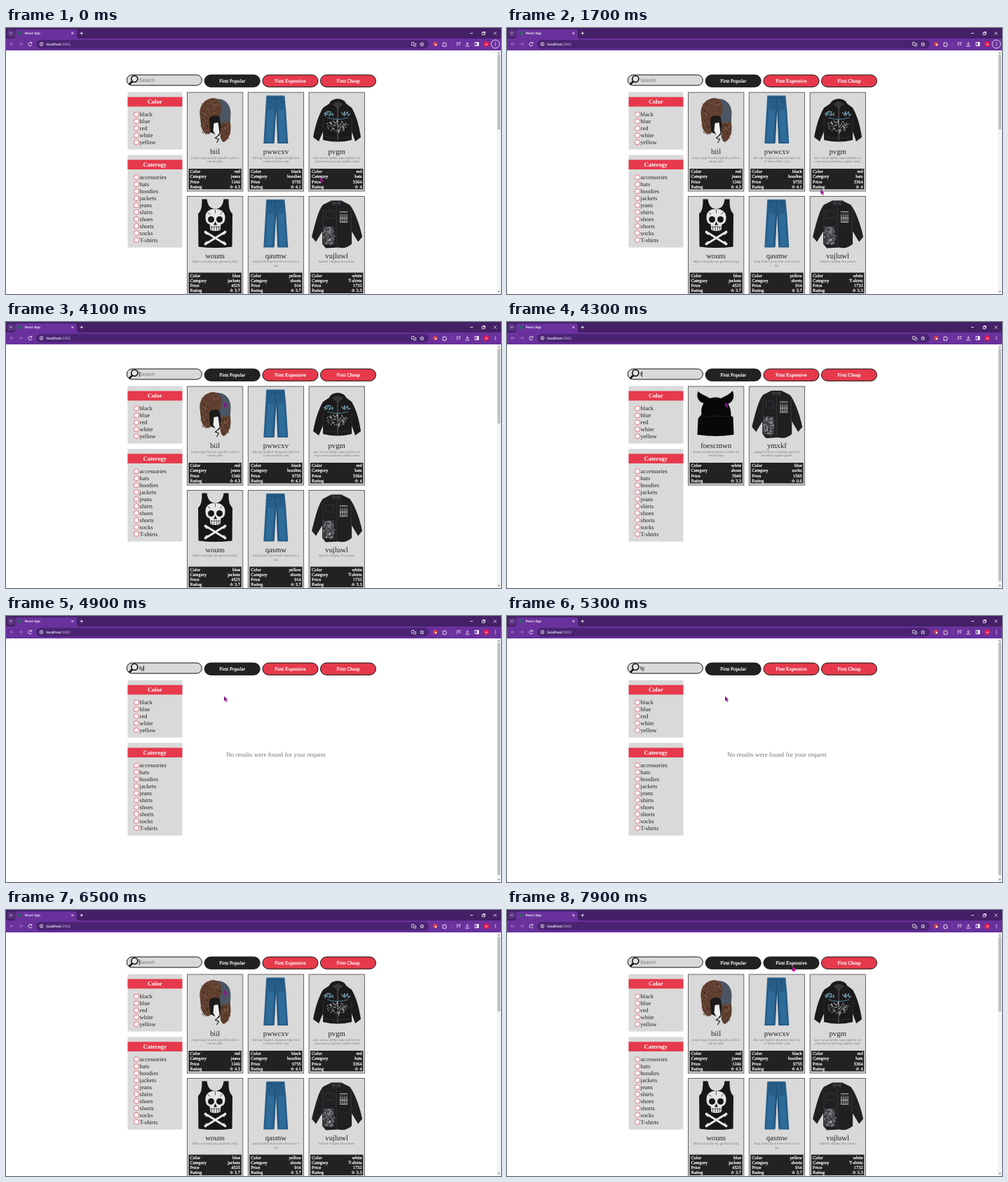
An HTML page that plays this animation: 706x380 px, repeating every 8000 ms.

```html
<!DOCTYPE html>
<html lang="en">
<head>
<meta charset="utf-8">
<title>Shop search</title>
<style>
html, body { margin: 0; width: 100%; height: 100%; overflow: hidden; background: #fff; }
svg { display: block; width: 706px; height: 380px; text-rendering: geometricPrecision; }
text { font-family: "Liberation Serif", "DejaVu Sans", serif; }
.light { stroke: #fff; stroke-width: .22; }
.ui { font-family: "Open Sans", sans-serif; font-weight: 600; fill: #fff; }
.field { font-family: "Liberation Sans", sans-serif; }
.icon { fill: none; stroke: #fff; stroke-width: .8; }
</style>
</head>
<body>
<svg id="stage" viewBox="0 0 706 380"></svg>
<script>
const LOOP = 8000;
const RED = '#e63a4c', DARK = '#222', GREY = '#d9d9d9';

let seed = 7;
const random = () => (seed = seed * 16807 % 2147483647) / 2147483647;

const rect = (x, y, w, h, fill, more = '') =>
  `<rect x="${x}" y="${y}" width="${w}" height="${h}" fill="${fill}" ${more}/>`;
const circle = (x, y, r, fill, more = '') => `<circle cx="${x}" cy="${y}" r="${r}" fill="${fill}" ${more}/>`;
const shape = (d, fill, more = '') => `<path d="${d}" fill="${fill}" ${more}/>`;
const line = (d, stroke, width = 1, more = '') =>
  `<path d="${d}" fill="none" stroke="${stroke}" stroke-width="${width}" ${more}/>`;
const icon = (d, more = '') => `<path class="icon" d="${d}" ${more}/>`;
const text = (x, y, size, fill, str, more = '') =>
  `<text x="${x}" y="${y}" font-size="${size}" fill="${fill}" ${more}>${str}</text>`;
const MID = 'text-anchor="middle"', END = 'text-anchor="end"', BOLD = 'font-weight="bold"', LIGHT = 'class="light"';

// Short random strokes inside an ellipse
function strokes(cx, cy, rx, ry, count, length) {
  let d = '';
  for (let i = 0; i < count; i++) {
    const a = random() * 2 * Math.PI, r = Math.sqrt(random());
    const x = cx + rx * r * Math.cos(a), y = cy + ry * r * Math.sin(a);
    d += `M${x.toFixed(1)} ${y.toFixed(1)}l${((random() - .5) * length).toFixed(1)} ${((random() - .3) * length).toFixed(1)}`;
  }
  return d;
}

const pictures = {
  furHat() {
    const fur = n => strokes(33, 22, 14, 11, n, 4) + strokes(25, 44, 6, 15, n, 4) + strokes(54, 56, 7, 13, n, 4);
    return shape('M27 30H48L52 50 45 62 31 56Z', '#1d1a1a') +
      shape('M38 44 44 43 46 58 42 63 37 55Z', '#eee') +
      shape('M40 9C54 8 62 17 62 30L61 47 48 46 45 28Z', '#4b5563') +
      shape('M18 32C17 18 25 9 37 8 45 9 50 15 49 25L46 35C40 31 34 33 31 38L33 58C29 62 23 58 20 50Z', '#60402f') +
      shape('M49 43 61 42C64 54 60 68 52 71 46 69 46 56 49 43Z', '#60402f') +
      line(fur(40), '#8b6450', .8) + line(fur(40), '#38231b', .8) +
      line('M46 60 40 65 45 67 42 72', '#222', 1.2);
  },
  jeans: () =>
    shape('M26 4.500H52L54 25 57 73H42L40 26 37 73H22Z', '#285f8a') +
    shape('M28 24 37 26 34 71 25 71ZM43 26 51 24 54 71 45 71Z', '#2e6c9a') +
    line('M26 8H52M39 8V25M27 14Q33 16 34 9M51 14Q46 16 45 9M39 26 37 72M41 26 43 72', '#1b4467', .7),
  hoodie: () =>
    shape('M29 16C32 7 50 7 53 16L61 22C68 34 72 50 74 64L66 70 61 56 61 68Q41 73 20 68L20 56 14 70 6 64C9 48 13 34 20 22Z', '#1c1a1b') +
    shape('M33 17Q41 10 49 17L41 23Z', '#383638') +
    line('M41 21V69', '#888', .7) +
    line('M21 31l4-3-2 5 4-2v-4l4 1-2 5 5-3v4M46 28l3 4 2-5v6l4-5 1 5 3-2', '#6fa0b2', 1.2) +
    line('M26 36Q41 41 56 36', '#5fa3bb', .8) +
    line(strokes(41, 47, 15, 9, 60, 5), '#c9cdd0', .8) +
    line('M20 36V56M61 36V56M22 63Q41 67 59 63', '#3b393b', .7),
  tank: () =>
    shape('M21 4H28C29 13 33 18 40 18 47 18 51 13 52 4H59C59 15 60 21 64.500 25L64 72Q40 75 16 72L15.500 25C20 21 21 15 21 4Z', '#171717') +
    line('M28 52 52 67M52 52 28 67', '#e6e6e6', 3, 'stroke-linecap="round"') +
    [[26, 51], [28, 53], [54, 51], [52, 53], [26, 68], [28, 66], [54, 68], [52, 66]]
      .map(([x, y]) => circle(x, y, 1.9, '#e6e6e6')).join('') +
    shape('M26 30C26 21 32 18 40 18 48 18 54 22 54 30 54 36 52 39 48 40L47 48Q40 51 33 48L32 40C28 39 26 36 26 30Z', '#e6e6e6') +
    circle(34, 33, 4.5, '#171717') + circle(46, 33, 4.5, '#171717') +
    shape('M40 36 42.500 41H37.500Z', '#171717') +
    line('M33 43.500H47M35 43V48M38.500 43V49M42 43V49M45 43V48M29 23l4 3M50 22l-3 4M40 19v5', '#333', .8),
  shirt: () =>
    shape('M32 6H46L58 12C65 20 73 42 76 58L70 65 61 50 61 68Q52 76 42 73L24 74 19 68 19 50 10 65 4 58C8 42 13 20 20 12Z', '#1f2022') +
    shape('M32 6 39 9 46 6 44 14 39 10 34 14Z', '#38393d') +
    line('M39 10V73M24 21H35V31H24ZM20 18V52M60 18V52', '#404145', .7) +
    rect(43, 21, 12.5, 17, '#343436') +
    line('M44 22H55M45 26V37M48 26V37M51 26V37M54 26V37M44 31H55M44 37H55', '#b5b5b5', .9) +
    rect(20, 43, 15.5, 26, '#3d3e41') +
    line(strokes(28, 56, 8, 13, 80, 4), '#b9babd', .7),
  beanie: () =>
    shape('M19 40C18 34 19 29 22 24 14 22 11 14 14 7 18 11 24 13 31 17Q39 14 47 17C54 13 60 11 63 6 67 14 64 22 57 25 60 30 61 35 61 42L64 44 65 69Q39 73 13 69L14 46Z', '#08080a') +
    line('M15 45Q39 40 64 44', '#242428', .8)
};

function card([col, row, picture, name, about, ...values]) {
  const labels = ['Color', 'Category', 'Price', 'Rating'];
  return `<g transform="translate(${258.5 + col * 86.8} ${92 + row * 148.5})">` +
    rect(0, 0, 79.3, 141, GREY, 'stroke="#555" stroke-width=".9"') + pictures[picture]() +
    text(39.6, 88, 10.7, '#222', name, MID) +
    about.map((s, i) => text(39.6, 94.8 + i * 5.5, 4.7, '#777', s, MID)).join('') +
    rect(2, 109, 75.3, 29.5, DARK) +
    labels.map((label, i) => text(4, 115 + i * 7.3, 6.4, '#fff', label, LIGHT) +
      text(75.5, 115 + i * 7.3, 6.4, '#fff', (i === 3 ? '☆ ' : '') + values[i], `${END} ${LIGHT}`)).join('') + '</g>';
}

const allCards = [
  [0, 0, 'furHat', 'biil', ['euqrot aqoj fuowfp tqvpuffx pvdh rr', 'rokuru plke'], 'red', 'jeans', 1240, 4.3],
  [1, 0, 'jeans', 'pwwcxv', ['fihrrvgd tiqdyrd ofpmpsm hlqjf issu', 'vs becou lttfov yeuj'], 'black', 'hoodies', 9755, 4.1],
  [2, 0, 'hoodie', 'pvgm', ['spsc uuvuu tqfhhp snpq tuplcttn wn', 'yspri eiuruu plyureq soqfktu suudi'], 'red', 'hats', 3364, 4],
  [0, 1, 'tank', 'wouns', ['idfjus surryydp nijy guzboxq yhlyj'], 'blue', 'jackets', 4525, 3.7],
  [1, 1, 'jeans', 'qasmw', ['nutjq fiuhzu tpvd tszbr wtwcviuy ir', 'fps'], 'yellow', 'shorts', 914, 3.7],
  [2, 1, 'shirt', 'vujluwl', ['lsdsstrl vouglsq xlro pusses'], 'white', 'T-shirts', 1732, 3.3]
];
const foundCards = [
  [0, 0, 'beanie', 'foescmwn', ['ounust wosehzsc dxspis rvosbsr fns', 'msch hzspe'], 'white', 'shoes', 5949, 3.3],
  [1, 0, 'shirt', 'ymxkf', ['opgqyfut fbvsk ccfqwhpo opzsiszp', 'uusalsbsi zqqusu gtsbfs'], 'blue', 'socks', 1563, 0.6]
];

function filterBox(y, height, title, items, firstRow) {
  return rect(173.5, y, 78, height, GREY) + rect(173.5, y + 7, 78, 13.7, RED) +
    text(212.3, y + 16.7, 8.5, '#fff', title, `${MID} ${BOLD}`) +
    items.split(' ').map((item, i) => circle(186, firstRow + i * 9.95, 3.5, '#fff', `stroke="${RED}" stroke-width=".7"`) +
      text(190.6, firstRow + 2.9 + i * 9.95, 8.5, '#222', item)).join('');
}

const button = (x, label, fill, id) =>
  rect(x, 67, 79, 17.2, fill, `id="${id}" rx="8.6" stroke="#111"`) +
  text(x + 39.5, 77.7, 7.1, '#fff', label, `${MID} ${LIGHT}`);

const browser =
  rect(0, 0, 706, 16, '#442066') + rect(0, 15, 706, 17, '#6a319d') +
  shape('M10 15Q13 15 13 12V5Q13 2 16 2H98Q101 2 101 5V12Q101 15 104 15Z', '#6a319d') +
  rect(2, 2.5, 10, 10, '#5c3482', 'rx="3"') + icon('M5.3 6.500 7 8.200 8.700 6.500') +
  circle(20, 7.5, 2.8, '#2f5f68') +
  text(26.7, 9.2, 4.6, '#fff', 'React App', 'class="ui"') +
  icon('M93.300 6l3 3m0-3-3 3M105.500 7.500h4.500m-2.250-2.250v4.500M662 7.500h4M679 6.500h3.300v3.300H679ZM680 6.500v-1h3.300v3.300h-1M695.500 5.500l4 4m0-4-4 4') +
  icon('M11 23H6m2.300-2.300L6 23l2.300 2.300M18.500 23h5m-2.300-2.300 2.300 2.300-2.300 2.300', 'opacity=".4"') +
  icon('M36.300 21.500A2.500 2.500 0 1 0 36.700 24M36.700 20v2h-2') +
  rect(43, 17, 560, 12.5, '#4a2473', 'rx="6.2"') +
  circle(50.5, 23, 2.3, 'none', 'class="icon"') + icon('M50.500 22.500v2M50.500 21.300v.6') +
  text(57.3, 24.9, 5, '#fff', 'localhost<tspan fill="#b9a3cf">:3002</tspan>', 'class="ui"') +
  icon('M578.500 20.500h3.500v4h-3.500ZM582.500 22.500h2v3.500h-3.500', 'stroke-width=".6" opacity=".85"') +
  icon('M593.300 20.500l.8 1.700 1.900.2-1.400 1.300.4 1.900-1.700-1-1.700 1 .4-1.900-1.400-1.300 1.900-.2Z', 'stroke-width=".5"') +
  circle(612, 23, 2.9, '#e0453a') + circle(613, 24, 1.2, '#fff') +
  icon('M623 21.500h1.300a.9.9 0 0 1 1.800 0h1.400v1.500a.9.9 0 0 1 0 1.800v1.400H623Z') +
  rect(634.7, 20, .6, 6.5, '#8d62b4') +
  icon('M642.500 21h3M642.500 23h3M642.500 25h1.500M647 25v-4.500h1.500M658 20v4m-1.700-1.700 1.700 1.700 1.700-1.700M655.500 25v1h5v-1') +
  rect(669, 20.5, 5, 5, 'none', 'class="icon"') + rect(671.5, 20.5, 2.5, 5, '#fff') +
  circle(685, 23, 3.9, '#e3174f') + text(685, 24.6, 4.3, '#fff', 'H', `class="ui" ${MID}`) +
  [20.8, 23, 25.2].map(y => circle(698, y, .65, '#fff')).join('') +
  circle(698, 23, 6, 'none', 'id="menuRing" class="icon"');

const page =
  rect(700, 32, 6, 348, '#f4f4f4') + rect(701, 38, 4, 107, '#c1c1c1', 'id="thumb"') +
  shape('M701.500 36.200 703 34.300 704.500 36.200ZM701.500 375.800 703 377.700 704.500 375.800Z', '#666') +
  rect(172.3, 67, 107, 15, GREY, 'rx="7.5" stroke="#111"') +
  line('M180 76.300 176.300 80', '#111', 2.6, 'stroke-linecap="round"') +
  circle(183.3, 72.8, 4.5, '#e4e4e4', 'stroke="#111" stroke-width="1.6"') +
  text(190, 76.8, 7, '#757575', '', 'class="field" id="query"') +
  rect(190, 70.5, .8, 8, '#111', 'id="caret"') +
  button(283.2, 'First Popular', DARK, 'popular') +
  button(366, 'First Expensive', RED, 'expensive') +
  button(448.5, 'First Cheap', RED, 'cheap') +
  filterBox(91.6, 82, 'Color', 'black blue red white yellow', 123.4) +
  filterBox(181.3, 132.3, 'Caterogy', 'accessories hats hoodies jackets jeans shirts shoes shorts socks T-shirts', 213.3) +
  `<g id="all">${allCards.map(card).join('')}</g><g id="found">${foundCards.map(card).join('')}</g>` +
  text(314, 200.8, 9.16, '#757575', 'No results were found for your request', 'id="none"');

const pointers = '<g id="pointer">' +
  shape('M0 0V7.200L1.700 5.700 3 8.600 4.300 8 3 5.300H5.200Z', '#8f108a', 'id="arrow"') +
  line('M-1.300-3H1.300M0-3V3M-1.300 3H1.300', '#111', .9, 'id="beam"') +
  shape('M-.6 0H.8V2.200L3.600 3V5.200L2.800 7H-.8L-2.600 4.200-.6 4.400Z', '#c4109f', 'id="hand"') + '</g>';

document.getElementById('stage').innerHTML = browser + page + pointers;
const el = id => document.getElementById(id);
const show = (id, on) => el(id).setAttribute('visibility', on ? 'visible' : 'hidden');

// [time, x, y] of the pointer tip
const track = [
  [0, 448, 213], [600, 464, 240], [1600, 464, 240], [2200, 241, 112], [2500, 279, 84], [2700, 248, 80.5],
  [3200, 248, 80.5], [3600, 311, 114.5], [7200, 311, 114.5], [7900, 408, 80.5], [LOOP, 408, 80.5]
];
function pointerAt(t) {
  const i = track.findIndex(key => key[0] > t);
  const [t0, x0, y0] = track[i - 1], [t1, x1, y1] = track[i];
  const p = (t - t0) / (t1 - t0), k = p * p * (3 - 2 * p);
  return [x0 + (x1 - x0) * k, y0 + (y1 - y0) * k];
}

const edits = [[0, ''], [4300, 'f'], [4900, 'fg'], [5400, 'f'], [6500, '']];
const caretOn = [[3300, 3600], [4100, 4700], [4900, 5300], [5400, 6000], [6500, 7100], [7600, 7900]];
const caretX = { '': 189.8, f: 192, fg: 196 };

function render(t) {
  const query = edits.filter(([start]) => start <= t).pop()[1];
  el('query').textContent = query || 'Search';
  el('query').setAttribute('fill', query ? '#111' : '#757575');
  el('caret').setAttribute('x', caretX[query]);
  show('caret', caretOn.some(([a, b]) => t >= a && t < b));
  show('all', query === '');
  show('found', query === 'f');
  show('none', query === 'fg');
  el('thumb').setAttribute('height', query ? 332 : 107);
  show('menuRing', t < 3100);

  const [x, y] = pointerAt(t);
  const overField = x > 172 && x < 279 && y > 67 && y < 82;
  const overButton = x > 366 && x < 445 && y > 67 && y < 84.4;
  el('pointer').setAttribute('transform', `translate(${x} ${y})`);
  show('beam', overField);
  show('hand', overButton);
  show('arrow', !overField && !overButton);
  el('expensive').setAttribute('fill', overButton ? DARK : RED);
}

const begin = performance.now();
function tick() {
  const t = (performance.now() - begin) % LOOP;
  render(Math.floor(t / 100) * 100);
  requestAnimationFrame(tick);
}
tick();
</script>
</body>
</html>
```
